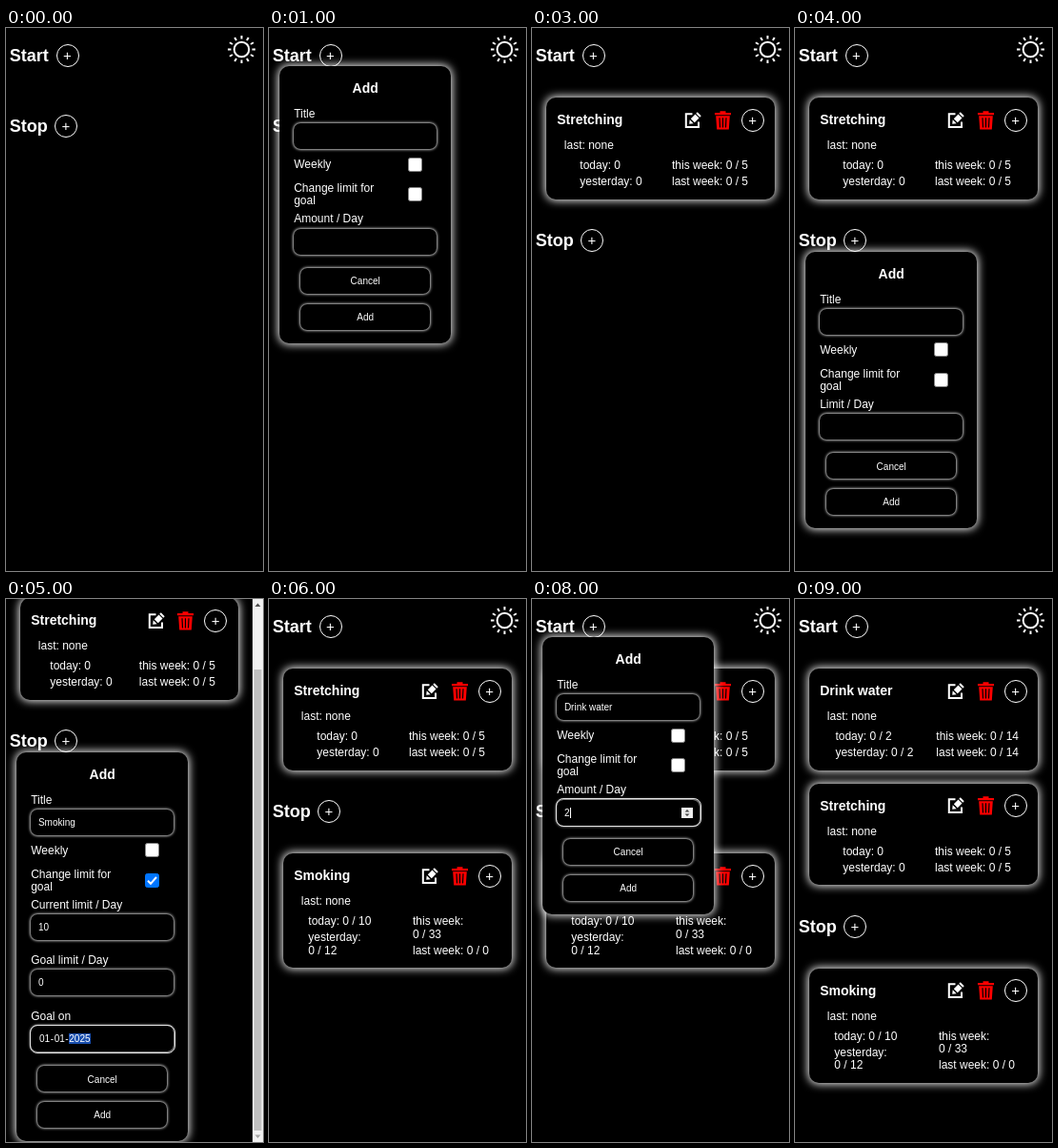
Animation of 270 by 570 pixels, one loop 10000 ms. Source, as an HTML page:

```html
<!DOCTYPE html>
<html lang="en">
<head>
<meta charset="utf-8">
<title>Habit tracker</title>
<style>
html, body { margin: 0; width: 100%; height: 100%; overflow: hidden; background: #000; }
body { position: relative; color: #fff; font-family: "Liberation Sans", Arial, sans-serif; }
div, svg { position: absolute; box-sizing: border-box; }
.scene { inset: 0; overflow: hidden; visibility: hidden; animation: show 10s step-end infinite; }
@keyframes show { 0% { visibility: visible; } 10%, 100% { visibility: hidden; } }
.page { inset: 0; }
.text { white-space: pre; }
.panel { background: #000; border-radius: 10px; box-shadow: 0 0 10px 1px #fff; }
.field { background: #000; border-radius: 7px; box-shadow: 0 0 3px .5px #fff; }
.ring { border: 1.3px solid #e4e4e4; border-radius: 8px; }
.plus { border: 1px solid #fff; border-radius: 50%; font-size: 15px; line-height: 22px; text-align: center; }
.box { background: #fff; border: 1px solid #858585; border-radius: 2.5px; }
.box.on { background: #0075ff; border-color: #0075ff; }
.caret { background: #fff; }
.date i { font-style: normal; padding: 0 .6px; }
.date i:last-child { background: #1a4fae; }
</style>
</head>
<body>
<script>
const SHIFT = 120.7;   // height of one card with its gap
const SCROLL = 74;

const box = (cls, x, y, w, h, inner = '') =>
  `<div class="${cls}" style="left:${x}px;top:${y}px;width:${w}px;height:${h}px">${inner}</div>`;

// y is the baseline
const text = (str, x, y, size = 12, bold = false) =>
  `<div class="text" style="left:${x}px;top:${y - Math.round(size * .905)}px;font-size:${size}px;` +
  `font-weight:${bold ? 700 : 400}">${str}</div>`;

const centered = (str, y, size, bold = false) =>
  `<div class="text" style="left:0;width:180px;text-align:center;top:${y - Math.round(size * .905)}px;` +
  `font-size:${size}px;font-weight:${bold ? 700 : 400}">${str}</div>`;

const icon = (x, y, w, h, inner) =>
  `<svg style="left:${x}px;top:${y}px" width="${w}" height="${h}" viewBox="0 0 ${w} ${h}">${inner}</svg>`;

const plus = (cx, cy) => box('plus', cx - 12, cy - 12, 24, 24, '+');

const heading = (name, cy, plusX) => text(name, 3.8, cy + 6, 18, true) + plus(plusX, cy);

function sun() {
  const rays = Array.from({ length: 12 }, (_, i) =>
    `<path d="M0-11V-14.5" transform="rotate(${i * 30})"/>`).join('');
  return icon(232, 7, 31, 31,
    `<g transform="translate(15.5 15.5)" fill="none" stroke="#fff" stroke-width="2"><circle r="7.8"/>${rays}</g>`);
}

const pencil = x => icon(x, 14.7, 18, 18,
  `<path d="M8.5 2.3H1.8V16H15V10.5" fill="none" stroke="#fff" stroke-width="2"/>
   <path d="M5.7 8.3L9.7 12.3L5.2 12.8ZM6.8 7.2L11.5 2.5L15.5 6.5L10.8 11.2ZM12.3 1.7L13.8.3L17.7 4.2L16.3 5.7Z" fill="#fff"/>`);

const bin = x => icon(x, 13.7, 17, 20,
  `<path d="M0 2H5.5V.3H11.5V2H17V4.3H0ZM1.2 5.3H15.8L14.8 19.5H2.2Z" fill="#f00"/>
   <path d="M5 7.3L5.5 17.5M8.5 7.3V17.5M12 7.3L11.5 17.5" stroke="#000" stroke-width="1.2"/>`);

// Each column is [x, first line, second line, ...]; an indented line continues the one above
function column([x, ...lines]) {
  let y = 75;
  return lines.map((line, i) => {
    if (i) y += line.startsWith('0') ? 13.6 : 17;
    return text(line, x, y);
  }).join('');
}

function card(top, name, columns, width = 240, height = 106.5) {
  return box('panel', 15, top, width, height,
    text(name, 11.2, 28, 14, true) + text('last: none', 18.8, 54) +
    pencil(width - 94.7) + bin(width - 63.2) + plus(width - 23.3, 23.7) +
    columns.map(column).join(''));
}

const stretching = (top, narrow) => card(top, 'Stretching', [
  [narrow ? 31.3 : 35.3, 'today: 0', 'yesterday: 0'],
  [narrow ? 124.8 : 132, 'this week: 0 / 5', 'last week: 0 / 5']
], narrow ? 228.5 : 240);

const smoking = top => card(top, 'Smoking', [
  [26.3, 'today: 0 / 10', 'yesterday:', '0 / 12'],
  [136, 'this week:', '0 / 33', 'last week: 0 / 0']
], 240, 120);

const water = top => card(top, 'Drink water', [
  [27.4, 'today: 0 / 2', 'yesterday: 0 / 2'],
  [133.3, 'this week: 0 / 14', 'last week: 0 / 14']
]);

function input(y, value = '', kind = '') {
  let html = box('field', 15.3, y, 149.5, 27);
  if (kind) html += box('ring', 13.8, y - 1.3, 153, 30);
  if (kind === 'date') {
    const parts = value.split('-').map(p => `<i>${p}</i>`).join('-');
    return html + `<div class="date">${text(parts, 23.2, y + 17, 10)}</div>`;
  }
  html += text(value, 22.7, y + 17, 10);
  if (kind === 'number') {
    html += box('caret', 28.4, y + 8, 1, 11) + icon(146, y + 8, 12, 11,
      `<path d="M0 0H12V11H0Z" fill="#efefef"/><path d="M3.5 4.5L6 2L8.5 4.5ZM3.5 6.5L6 9L8.5 6.5Z" fill="#444"/>`);
  }
  return html;
}

const check = (y, on) => box(on ? 'box on' : 'box', 135, y, 15, 15,
  on ? icon(0, 0, 13, 13, '<path d="M2 6.8L5 9.8L11 3" fill="none" stroke="#fff" stroke-width="2"/>') : '');

const button = (y, label) => box('field', 22.3, y, 136, 27) + centered(label, y + 17.3, 10);

// fields: [label, value, kind]
function dialog(top, fields, { title = '', weekly = false, goal = false } = {}) {
  const extra = fields.length > 1 ? (fields.length - 1) * 58.5 + 1 : 0;
  return box('panel', 11.2, top, 180, 290.6 + extra,
    centered('Add', 28, 14, true) +
    text('Title', 15, 54) + input(60.2, title) +
    text('Weekly', 15, 107) + check(95.3, weekly) +
    text('Change limit for', 15, 132) + text('goal', 15, 145) + check(127, goal) +
    fields.map(([label, value, kind], i) =>
      text(label, 15, 164 + i * 58.5) + input(170.3 + i * 58.5, value, kind)).join('') +
    button(211.7 + extra, 'Cancel') + button(249.3 + extra, 'Add'));
}

// Page with a number of cards below "Start"
const page = (count, cards = '', overlay = '') =>
  sun() + heading('Start', 29, 64.5) + heading('Stop', 102.7 + count * SHIFT, 63) + cards + overlay;

function scrollbar() {
  return icon(259, 0, 11, 570,
    `<path d="M0 0H11V570H0Z" fill="#f1f1f1"/><path d="M1.5 74H9.5V558H1.5Z" fill="#c1c1c1"/>
     <path d="M2.5 8L5.5 4.5L8.5 8Z" fill="#505050"/><path d="M2.5 562.5L5.5 566L8.5 562.5Z" fill="#a3a3a3"/>`);
}

const START = 40.3, STOP = 234.5, FIRST = 73;
const stopCard = count => smoking(146.4 + count * SHIFT);
const one = stretching(FIRST);
const both = one + stopCard(1);
const quitting = dialog(STOP, [
  ['Current limit / Day', '10'],
  ['Goal limit / Day', '0'],
  ['Goal on', '01-01-2025', 'date']
], { title: 'Smoking', goal: true });

const scenes = [
  page(0),
  page(0, '', dialog(START, [['Amount / Day']])),
  page(0, '', dialog(START, [['Amount / Week', '5', 'number']], { title: 'Stretching', weekly: true })),
  page(1, one),
  page(1, one, dialog(STOP, [['Limit / Day']])),
  `<div class="page" style="top:${-SCROLL}px">${page(1, stretching(FIRST, true), quitting)}</div>` + scrollbar(),
  page(1, both),
  page(1, both, dialog(START, [['Amount / Day']])),
  page(1, both, dialog(START, [['Amount / Day', '2', 'number']], { title: 'Drink water' })),
  page(2, water(FIRST) + stretching(FIRST + SHIFT) + stopCard(2))
];

document.body.insertAdjacentHTML('beforeend', scenes.map((html, i) =>
  `<div class="scene" style="animation-delay:${i - 10}s">${html}</div>`).join(''));
</script>
</body>
</html>
```
